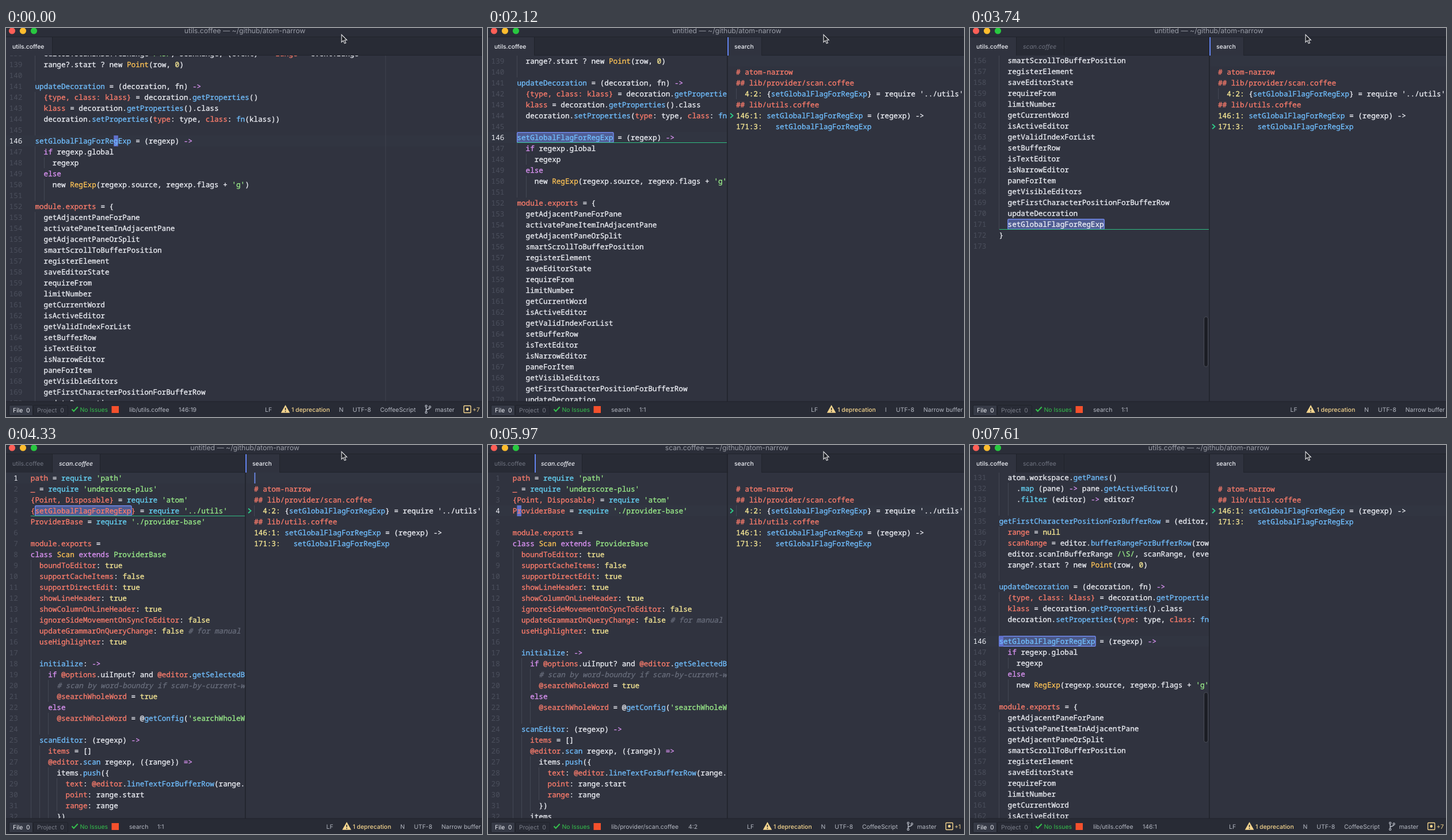
Recreate the animation shown at these times as an HTML page. Size 827 by 677 pixels, loop 8000 ms.

```html
<!DOCTYPE html>
<html lang="en">
<head>
<meta charset="utf-8">
<title>Editor search</title>
<style>
  html, body { margin: 0; width: 100%; height: 100%; overflow: hidden; background: #30333f; }
  svg { display: block; }
  text { font: 10.4px Inter, "Open Sans", sans-serif; text-rendering: geometricPrecision; fill: #b4b8c2; }
  .code { font: 12.67px "Noto Sans Mono", "DejaVu Sans Mono", monospace; stroke-width: .3px; }
  .title { font-size: 12.2px; text-anchor: middle; fill: #9a9da7; }
</style>
</head>
<body>
<svg id="stage" width="827" height="677" viewBox="0 0 827 677"></svg>
<script>
const ROW = 19, CHAR = 7.6, LOOP = 8000;
const NAME = 'setGlobalFlagForRegExp';
const ROW_TINT = '#313541';
const COLORS = {
  w: '#eef0f6', b: '#71bfff', r: '#fd7d6c', o: '#ffc456', y: '#faeb96',
  p: '#dd94f6', g: '#9bee8a', c: '#66d5f8', k: '#696e7c'
};

// "^x" switches to colour x until the next switch
const utilsLines = String.raw`  atom.workspace.^bgetPanes^w()
    .^cmap^w (pane) ^p->^w pane.^bgetActiveEditor^w()
    .^cfilter^w (editor) ^p->^w editor?

^bgetFirstCharacterPositionForBufferRow^w = (editor, row) ^p->
  ^rrange^w = ^ynull
  ^rscanRange^w = editor.^bbufferRangeForBufferRow^w(row)
  editor.scanInBufferRange ^g/\S/^w, scanRange, (event) ^p-> ^rrange^w = event.range
  range?.start ? new ^oPoint^w(row, ^y0^w)

^bupdateDecoration^w = (decoration, fn) ^p->
  ^r{type, class: klass}^w = decoration.^bgetProperties^w()
  ^rklass^w = decoration.^bgetProperties^w().class
  decoration.^bsetProperties^w(^rtype^w: type, ^rclass^w: ^bfn^w(klass))

^bsetGlobalFlagForRegExp^w = (regexp) ^p->
  ^pif^w regexp.global
    regexp
  ^pelse
    new ^oRegExp^w(regexp.source, regexp.flags + ^g'g'^w)

^rmodule.exports^w = {
  getAdjacentPaneForPane
  activatePaneItemInAdjacentPane
  getAdjacentPaneOrSplit
  smartScrollToBufferPosition
  registerElement
  saveEditorState
  requireFrom
  limitNumber
  getCurrentWord
  isActiveEditor
  getValidIndexForList
  setBufferRow
  isTextEditor
  isNarrowEditor
  paneForItem
  getVisibleEditors
  getFirstCharacterPositionForBufferRow
  updateDecoration
  setGlobalFlagForRegExp
}
`.split('\n');

const scanLines = `^rpath^w = ^crequire ^g'path'
^r_^w = ^crequire ^g'underscore-plus'
^r{Point, Disposable}^w = ^crequire ^g'atom'
^r{setGlobalFlagForRegExp}^w = ^crequire ^g'../utils'
^rProviderBase^w = ^crequire ^g'./provider-base'

^rmodule.exports^w =
^pclass ^oScan ^pextends ^gProviderBase
  ^rboundToEditor^w: ^ytrue
  ^rsupportCacheItems^w: ^yfalse
  ^rsupportDirectEdit^w: ^ytrue
  ^rshowLineHeader^w: ^ytrue
  ^rshowColumnOnLineHeader^w: ^ytrue
  ^rignoreSideMovementOnSyncToEditor^w: ^yfalse
  ^rupdateGrammarOnQueryChange^w: ^yfalse ^k# for manual update
  ^ruseHighlighter^w: ^ytrue

  ^binitialize^w: ^p->
    ^pif ^r@options^w.uiInput? and ^r@editor^w.^bgetSelectedBufferRange^w()
      ^k# scan by word-boundry if scan-by-current-word
      ^r@searchWholeWord^w = ^ytrue
    ^pelse
      ^r@searchWholeWord^w = @^bgetConfig^w(^g'searchWholeWord'^w)

  ^bscanEditor^w: (regexp) ^p->
    ^ritems^w = []
    ^r@editor^w.^bscan^w regexp, ({range}) ^p=>
      items.^bpush^w({
        ^rtext^w: ^r@editor^w.^blineTextForBufferRow^w(range.start.row)
        ^rpoint^w: range.start
        ^rrange^w: range
      })
    items`.split('\n');

const utils = { lines: utilsLines, first: 131, x: 50.4, tab: 0 };
const scan = { lines: scanLines, first: 1, x: 42.8, tab: 1 };
const scanCut = { ...scan, lines: scanLines.filter((_, i) => i !== 3) };

const utilsHits = ['^r## lib/utils.coffee', `^y146:1: ^b${NAME}^w = (regexp) ->`, `^y171:3:   ^b${NAME}`];
const fewHits = ['', '^r# atom-narrow', ...utilsHits];
const allHits = ['', '^r# atom-narrow', '^r## lib/provider/scan.coffee',
  `  ^y4:2: ^w{^b${NAME}^w} = require '../utils'`, ...utilsHits];

const inSearch = { title: 'untitled', path: 'search', pos: '1:1', search: true, mode: 'N', cursor: null };
const inUtils = { title: 'utils.coffee', path: 'lib/utils.coffee', search: false, mode: 'N', git: '+7', line: 146 };
const inScan = { title: 'scan.coffee', path: 'lib/provider/scan.coffee', pos: '4:2', search: false,
  git: '+1', line: 4, cursor: [4, 1] };

// Each step changes the state left by the one before
let last = {};
const steps = [
  [0, { ...inUtils, file: utils, y: -98, pos: '146:19', cursor: [146, 18], tabs: 1, italic: true }],
  [750, { ...inSearch, mode: 'I', split: true, y: -104, caret: true, list: [''] }],
  [920, { list: allHits, pick: 5, hit: 146, fill: .48, rule: 415, searchMark: .5 }],
  [1070, { searchMark: 1 }],
  [1220, { caret: false }],
  [1670, { caret: true }],
  [2120, { caret: false }],
  [2410, { ...inUtils, pos: '146:19', cursor: [146, 18], searchMark: .5 }],
  [2560, { ...inSearch, file: scan, y: 48, line: 1, tabs: 2, hit: 4, pick: 3, caret: true, searchMark: 1 }],
  [2860, { caret: false }],
  [3300, { file: utils, y: 47, line: 146, hit: 146, pick: 5, caret: true, bar: 430 }],
  [3740, { y: -428, hit: 171, pick: 6, caret: false, bar: 502 }],
  [3890, { fill: .4 }],
  [4040, { caret: true }],
  [4330, { file: scan, y: 48, line: 1, hit: 4, pick: 3, bar: 0, fill: .48 }],
  [4480, { caret: false }],
  [4920, { ...inScan, searchMark: .5 }],
  [5070, { searchMark: 0, scanMark: true, rule: 81 }],
  [5370, { rule: 0 }],
  [5970, { file: scanCut, hit: 0 }],
  [6270, { dirty: 4, italic: false }],
  [6710, { dirty: 1, list: fewHits, pick: 0, git: '' }],
  [6860, { dirty: 0 }],
  [7460, { ...inUtils, file: utils, y: 47, pos: '146:1', cursor: [146, 0], hit: 146, fill: .4, pick: 3, bar: 430 }],
  [7610, { scanMark: false }]
].map(([time, change]) => ({ time, state: last = { ...last, ...change } }));

const rect = (x, y, w, h, fill, more = '') =>
  `<rect x="${x}" y="${y}" width="${w}" height="${h}" fill="${fill}" ${more}/>`;
const dot = (x, y, r, fill) => `<circle cx="${x}" cy="${y}" r="${r}" fill="${fill}"/>`;
const path = (d, stroke, width = 1, fill = 'none') =>
  `<path d="${d}" stroke="${stroke}" stroke-width="${width}" fill="${fill}"/>`;
const label = (x, y, text, fill = '#b4b8c2', more = '') =>
  `<text x="${x}" y="${y}" style="fill:${fill};${more}">${text}</text>`;

function codeLine(line, x, y) {
  let col = 0;
  const spans = line.split('^').map((part, i) => {
    const kind = i ? part[0] : 'w', text = i ? part.slice(1) : part;
    const start = x + (col + text.search(/\S/)) * CHAR;
    const slant = kind === 'k' ? 'font-style="italic"' : '';
    col += text.length;
    return text.trim() &&
      `<tspan x="${start}" fill="${COLORS[kind]}" stroke="${COLORS[kind]}" ${slant}>${text.trim()}</tspan>`;
  });
  return `<text class="code" y="${y + 13.5}">${spans.join('')}</text>`;
}

function codeBlock(lines, x, y) {
  let depth = 0;
  return lines.map((line, i) => {
    const top = y + i * ROW;
    if (line) depth = line.search(/\S/) >> 1;
    if (top < 25 || top > 650) return '';
    let out = '';
    for (let k = 0; k < depth; k++) out += rect(Math.round(x + k * 2 * CHAR), top, 1, ROW, '#434754');
    return out + codeLine(line, x, top);
  }).join('');
}

function editor(s) {
  const { lines, first, x } = s.file;
  const topOf = n => s.y + (n - first) * ROW;
  let out = rect(0, topOf(s.line), 827, ROW, ROW_TINT);
  if (!s.split) out += rect(659, 48, 1, 602, '#3d404c');
  if (s.hit) {
    const col = lines[s.hit - first].replace(/\^./g, '').indexOf(NAME);
    out += rect(x + col * CHAR + .3, topOf(s.hit) + .8, NAME.length * CHAR, 17.4, '#7189ed',
      `fill-opacity="${s.fill}" stroke="#7189ed" stroke-width="1.5" rx="1.5"`);
    if (s.rule) out += rect(x, topOf(s.hit) + 18, s.rule - x, 1, '#2fbd82');
  }
  if (s.cursor) out += rect(x + s.cursor[1] * CHAR, topOf(s.cursor[0]), CHAR, ROW, '#5f70cc');
  out += codeBlock(lines, x, s.y);
  lines.forEach((_, i) => {
    const n = first + i;
    out += `<text class="code" x="${x - 22}" y="${topOf(n) + 13.5}" text-anchor="end"
      style="fill:${n === s.line ? '#eef0f6' : '#4b4f5c'}">${n}</text>`;
  });
  if (s.bar) out += rect(406.5, s.bar + .5, 7, 87, '#1c1e25', 'rx="3.5" stroke="#4b4e58"');
  return out;
}

function searchPane(s) {
  const row = s.search ? 0 : s.pick;
  let out = rect(415, 47, 412, 603, '#30333f') + rect(415, 16, 1.5, 634, '#20232b');
  if (row || s.search) out += rect(418, 48 + row * ROW, 409, ROW, ROW_TINT);
  out += codeBlock(s.list, 431, 48);
  if (s.caret) out += rect(431.5, 48, 1.7, ROW, '#6f8cf0');
  if (s.pick) out += path(`M421 ${53.5 + s.pick * ROW}l4.5 4-4.5 4`, '#2fcb88', 1.8);
  return out;
}

function tab(x, w, text, active, italic) {
  return rect(x, 16, w, 32, active ? '#30333f' : '#282b35') + rect(x + w, 16, 1, 31, '#20232b') +
    label(x + 11, 36, text, active ? '#eef0f6' : '#707481',
      `font-weight:${active ? 500 : 400};font-style:${italic ? 'italic' : 'normal'}`);
}

function header(s) {
  let out = rect(0, 0, 827, 16, '#2b2e39') + rect(0, 15, 827, 1, '#20232b') +
    rect(0, 16, 827, 31, '#282b35') + rect(0, 47, 827, 1, '#20232b');
  ['#ff5f57', '#febc2e', '#28c840'].forEach((c, i) => out += dot(10.5 + i * 19, 5, 5.6, c));
  if (s.dirty > 1) out += dot(10.5, 5, 2, '#7c1712');
  out += `<text class="title" x="415" y="9.3">${s.title} — ~/github/atom-narrow</text>`;
  out += tab(0, 80, 'utils.coffee', s.file.tab === 0);
  if (s.tabs > 1) out += tab(81, 82, 'scan.coffee', s.file.tab === 1, s.italic);
  if (s.dirty) out += dot(152, 31, s.dirty, '#6f8cf0');
  if (s.scanMark) out += rect(81, 16, 2, 32, '#6484f0');
  if (s.split) {
    out += rect(415, 16, 1.5, 32, '#20232b') + tab(417, 58, 'search', true);
    if (s.searchMark) out += rect(416, 16, 2, 32, '#6484f0', `opacity="${s.searchMark}"`);
  }
  return out + path('M583 11.5v13.2l3-2.8 2.2 5 2.3-1-2.2-4.9h4z', '#e8e8ea', 1.1, '#1d1f25');
}

function statusBar(s) {
  const dx = s.search ? 106.5 : s.git ? 0 : 45.3;
  const lx = dx + (s.mode === 'I' ? 4.7 : 0);
  const amber = '#f5d58e', green = '#35c04d';
  let out = rect(0, 650, 827, 27, '#282b35') + rect(0, 649.5, 827, 1, '#20232b') +
    rect(5.5, 656.5, 41, 18, '#363a46', 'rx="2" stroke="#20232b"') +
    rect(47.5, 656.5, 60, 18, '#282b35', 'rx="2" stroke="#20232b"') +
    label(12, 669, 'File&#160; 0', '#eef0f6') + label(54, 669, 'Project&#160; 0', '#7b7f8a') +
    path('M114.5 663.5l3.2 3.5 7-7.5', green, 2) + label(128.5, 667.5, 'No Issues', green) +
    rect(183.5, 658, 12.5, 12, '#f4502c') +
    label(214, 667.5, s.path) +
    label(s.search ? 263 : s.path.includes('scan') ? 348 : 300, 667.5, s.pos);
  out += label(450 + lx, 667.5, 'LF') +
    path(`M${485.5 + lx} 657.5l6.5 11.5h-13z`, amber, 1.5, amber) +
    path(`M${485.5 + lx} 661v4m0 1.5v1.8`, '#282b35', 1.6) +
    label(496 + lx, 667.5, '1 deprecation', amber, 'font-weight:500') +
    label(578.5 + lx, 667.5, s.mode) +
    label(602.3 + dx, 667.5, 'UTF-8') +
    label(650 + dx, 667.5, s.search ? 'Narrow buffer' : 'CoffeeScript');
  if (s.search) return out;
  const bx = 730 + dx;
  out += path(`M${bx} 659.5v8M${bx} 666q0-2 3-2.5t3.5-3`, '#b4b8c2', 1.4);
  [[0, 658], [0, 669], [6.5, 659.5]].forEach(([x, y]) =>
    out += `<circle cx="${bx + x}" cy="${y}" r="1.6" fill="#282b35" stroke="#b4b8c2" stroke-width="1.2"/>`);
  out += label(745.5 + dx, 667.5, 'master');
  if (s.git) out += rect(795.5, 657.5, 12, 12, 'none', `rx="1" stroke="${amber}" stroke-width="1.4"`) +
    dot(801.5, 663.5, 2.4, amber) + label(810.5, 667.5, s.git, amber);
  return out;
}

const stage = document.getElementById('stage');
let shown;
function draw(now) {
  const time = now % LOOP;
  const step = steps.findLast(item => item.time <= time);
  if (step !== shown) {
    const s = step.state;
    stage.innerHTML = rect(0, 0, 827, 677, '#30333f') + editor(s) +
      (s.split ? searchPane(s) : '') + header(s) + statusBar(s);
    shown = step;
  }
  requestAnimationFrame(draw);
}
draw(performance.now());
</script>
</body>
</html>
```
